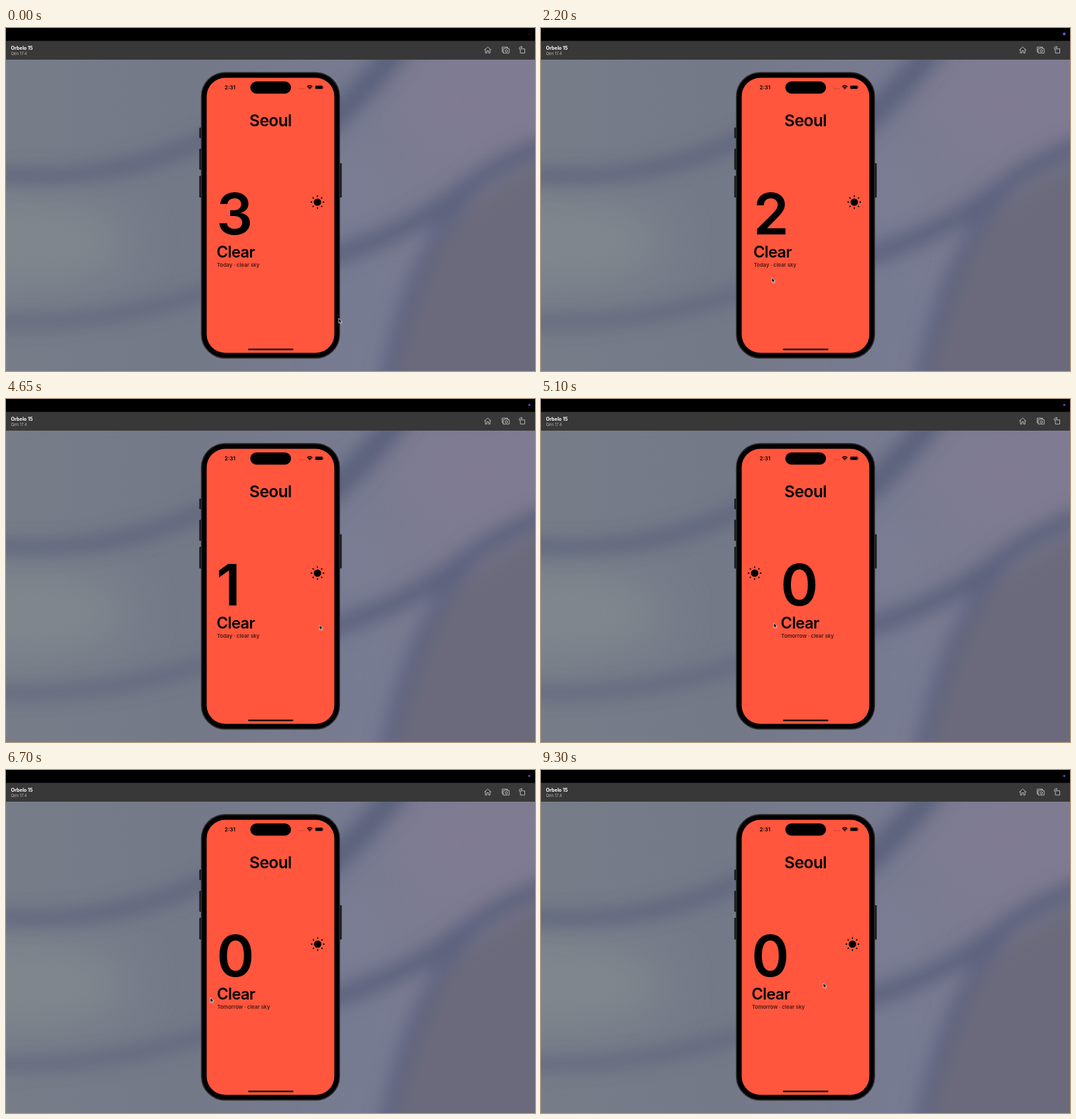
An HTML page that plays this animation: 800 px wide and 520 px high, repeating every 9350 ms.

```html
<!DOCTYPE html>
<html lang="en">
<head>
<meta charset="utf-8">
<title>Weather</title>
<style>
  html, body { margin: 0; width: 100%; height: 100%; overflow: hidden; background: #000; }
  svg { display: block; width: 100vw; height: 100vh; }
  text { font-family: Inter, Roboto, sans-serif; font-weight: 600; }
  .line { fill: none; stroke-linecap: round; stroke-linejoin: round; }
</style>
</head>
<body>
<svg viewBox="0 0 800 520">
  <defs>
    <filter id="soft" x="-20%" y="-20%" width="140%" height="140%"><feGaussianBlur stdDeviation="13"/></filter>
    <filter id="softer" x="-30%" y="-30%" width="160%" height="160%"><feGaussianBlur stdDeviation="36"/></filter>
    <linearGradient id="base">
      <stop offset="0" stop-color="#767d88"/>
      <stop offset=".35" stop-color="#747988"/>
      <stop offset=".65" stop-color="#787b91"/>
      <stop offset="1" stop-color="#7f7b91"/>
    </linearGradient>
    <clipPath id="desk"><rect y="48" width="800" height="472"/></clipPath>
    <clipPath id="glass"><rect x="303.5" y="75.5" width="193" height="417" rx="28"/></clipPath>
    <g id="sun">
      <circle r="5.6"/>
      <g id="rays" stroke="#000" stroke-width="1.8" stroke-linecap="round"/>
    </g>
  </defs>

  <!-- wallpaper -->
  <g clip-path="url(#desk)">
    <rect y="48" width="800" height="472" fill="url(#base)"/>
    <g filter="url(#softer)">
      <ellipse cx="40" cy="325" rx="150" ry="60" fill="#81878e"/>
      <ellipse cx="700" cy="110" rx="100" ry="60" fill="#807c93"/>
      <ellipse cx="530" cy="250" rx="50" ry="50" fill="#7b7e94"/>
      <ellipse cx="535" cy="420" rx="45" ry="70" fill="#767b93"/>
    </g>
    <g filter="url(#soft)">
      <path d="M850 190Q690 240 630 360Q590 440 580 570H850Z" fill="#6a6a7c"/>
      <g class="line" stroke="#5a607a">
        <path d="M-40 220Q150 242 310 165" stroke-width="20" opacity=".9"/>
        <path d="M-40 444Q150 454 320 396" stroke-width="18" opacity=".75"/>
        <path d="M600 20Q540 100 470 160" stroke-width="36"/>
        <path d="M480 350Q610 312 700 240Q750 200 850 165" stroke-width="26"/>
        <path d="M705 240Q610 345 570 560" stroke="#5c617f" stroke-width="23" opacity=".85"/>
      </g>
    </g>
  </g>

  <!-- window bars -->
  <rect width="800" height="20"/>
  <rect y="19.5" width="800" height="28.5" fill="#383838"/>
  <text x="7.5" y="32.7" font-size="7.2" fill="#fff" style="font-weight:700">Orbelo 15</text>
  <text x="7.5" y="40.6" font-size="6" fill="#b4b4b4" style="font-weight:400">Qen 17.4</text>
  <g class="line" stroke="#c6c6c6" stroke-width=".9">
    <path d="M723.5 33.3L728.5 28.8L733.5 33.3M725 32.3V38H727.2V34.5H729.8V38H732V32.3"/>
    <path d="M752 36H750.3V29H758.5V30.5M752.3 31.3H754.3L755 30.3H758L758.7 31.3H761V38H752.3Z"/>
    <circle cx="756.7" cy="34.6" r="1.8"/>
    <path d="M778.3 31.6H784.5V38H778.3ZM776.3 32.3V30.3Q776.3 29 777.7 29H780.5M779.2 27.6L780.6 29L779.2 30.4"/>
  </g>
  <circle id="lamp" cx="791.3" cy="9" fill="#5650cc"/>

  <!-- phone -->
  <g fill="#1d1d1f">
    <rect x="292.3" y="151" width="4" height="16" rx="1"/>
    <rect x="292.3" y="183" width="4" height="32" rx="1"/>
    <rect x="292.3" y="224" width="4" height="33" rx="1"/>
    <rect x="503.7" y="205" width="4" height="52" rx="1"/>
  </g>
  <rect x="295.6" y="67.6" width="208.8" height="432.8" rx="36" stroke="#2c2c2d" stroke-width="1.6"/>
  <rect x="303.5" y="75.5" width="193" height="417" rx="28" fill="#ff563d"/>

  <g clip-path="url(#glass)"><g id="pages"/></g>

  <text x="400" y="149" font-size="24.4" text-anchor="middle" letter-spacing="-.5">Seoul</text>
  <text x="330.6" y="93" font-size="8.2">2:31</text>
  <rect x="369.5" y="81" width="61.5" height="18.4" rx="9.2"/>
  <path class="line" d="M443.5 92H452" stroke="#a13a2b" stroke-width="1.3" stroke-dasharray="0 2.5"/>
  <path d="M455.4 89.2Q459.4 85.4 463.4 89.2M457 90.9Q459.4 88.7 461.8 90.9" fill="none" stroke="#000" stroke-width="1.3"/>
  <path d="M459.4 93.2L458 91.8Q459.4 90.8 460.8 91.8Z"/>
  <rect x="467.3" y="87" width="12" height="5.8" rx="1.8" fill="#822c20"/>
  <rect x="468" y="87.7" width="10.6" height="4.4" rx="1.2"/>
  <rect x="479.8" y="89" width=".8" height="2" rx=".4" fill="#822c20"/>
  <rect x="366" y="486" width="68.5" height="2.6" rx="1.3" fill="#240d09"/>

  <path id="cursor" d="M0 0V7.3L1.7 5.8L2.9 8.5L4.2 7.9L3 5.3H5.3Z" stroke="#fff" stroke-width=".7" stroke-linejoin="round"/>
</svg>

<script>
const LOOP = 9350, STEP = 50;
const PAGE = 192, DRAG = 122, LIFT = 3;                      // px
const HOLD = 300, PAUSE = 550, READY = 100, SETTLE = 108;    // ms
const byId = id => document.getElementById(id);

// Where and when the pointer presses to swipe left.
const swipes = [
  { press: 1550, x: 471, y: 381.5 },
  { press: 3284, x: 448.5, y: 367 },
  { press: 4750, x: 474, y: 342.5 },
  { press: 5850, x: 431, y: 348 },
  { press: 7250, x: 440, y: 343 }
];
const start = { x: 503, y: 440 };
const end = { press: LOOP, x: 427, y: 323 };

const ease = (t, from, to) => {
  const p = Math.min(1, Math.max(0, (t - from) / (to - from)));
  return p * p * (3 - 2 * p);
};
const mix = (a, b, p) => a + (b - a) * p;
const dragAt = (t, { press }) => DRAG * ease(t, press, press + HOLD);

byId('rays').innerHTML = Array.from({ length: 8 }, (_, i) =>
  `<path d="M0 -8.7V-9.5" transform="rotate(${i * 45})"/>`).join('');

byId('pages').innerHTML = [3, 2, 1, 0, 0, 0].map((degrees, i) => `
  <g transform="translate(${i * PAGE})">
    <text x="318.2" y="313.3" font-size="86.5">${degrees}</text>
    <text x="318.5" y="347.7" font-size="23.6" letter-spacing="-.55">Clear</text>
    <text x="319" y="361.6" font-size="7.9" fill-opacity=".72">${degrees ? 'Today' : 'Tomorrow'} · clear sky</text>
    <use href="#sun" x="471" y="264"/>
  </g>`).join('');

// Between swipes the pointer rests, then glides to its next press.
function pointerAt(t) {
  const index = swipes.findLastIndex(swipe => t >= swipe.press);
  const last = swipes[index], next = swipes[index + 1] || end;
  const from = last
    ? { x: last.x - dragAt(t, last), y: last.y - LIFT * ease(t, last.press, last.press + HOLD) }
    : start;
  const leave = last ? last.press + HOLD + PAUSE : 0;
  const p = ease(t, leave, next.press - READY);
  return [mix(from.x, next.x, p), mix(from.y, next.y, p)];
}

// The page follows the drag, then settles on the next stop.
function swipeOffset(t, swipe) {
  const sinceRelease = Math.max(0, t - swipe.press - HOLD);
  return mix(PAGE, dragAt(t, swipe), Math.exp(-sinceRelease / SETTLE));
}

function draw(t) {
  const scroll = swipes.reduce((sum, swipe) => sum + swipeOffset(t, swipe), 0);
  byId('pages').setAttribute('transform', `translate(${-scroll})`);
  byId('cursor').setAttribute('transform', `translate(${pointerAt(t)})`);

  const glow = ease(t, 0, 900), fade = ease(t, 2300, 3300);
  byId('lamp').setAttribute('r', 1.2 + 1.1 * glow - .5 * fade);
  byId('lamp').setAttribute('opacity', .3 + .7 * glow - .1 * fade);
}

function tick() {
  draw(Math.floor(performance.now() % LOOP / STEP) * STEP);
  requestAnimationFrame(tick);
}
tick();
</script>
</body>
</html>
```
